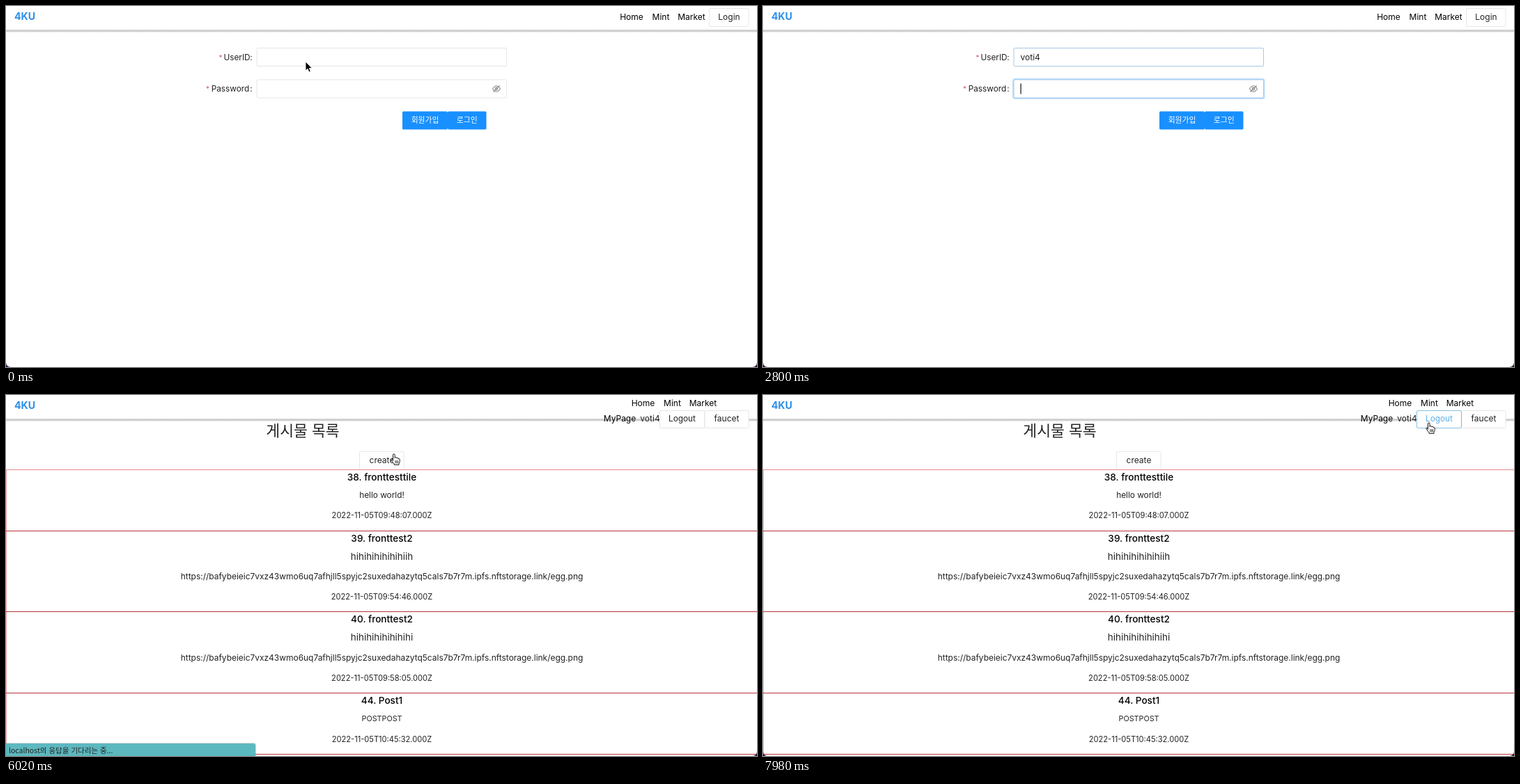
Animation of 1078 by 519 pixels, one loop 8 s. Source, as an HTML page:

```html
<!DOCTYPE html>
<html lang="ko">
<head>
<meta charset="utf-8">
<style>
html, body { margin: 0; width: 100%; height: 100%; overflow: hidden; background: #fff; }
svg { display: block; width: 1078px; height: 519px; }
text { font-family: Inter, "Noto Sans CJK KR", sans-serif; fill: #222; white-space: pre; }
.ko { font-family: "Noto Sans CJK KR", "Noto Sans CJK", sans-serif; }
.nav { fill: #000; }
.box { fill: #fff; stroke: #e6e6e6; }
</style>
</head>
<body>
<svg id="stage" viewBox="0 0 1078 519"></svg>
<script>
const LOOP = 8000, STEP = 70, LOGIN_DONE = 5880;
const USER = 'voti4', LEFT = 369.5, DOT = 4.7;
const userKeys = [1330, 1540, 1610, 1750, 2100];
const passKeys = [3080, 3150, 3220, 3430, 3500, 3570, 3710, 3850, 3920, 3990, 4340];
const FOCUS_USER = 490, FOCUS_PASS = 2520, SUBMIT = 4480;

// y is the optical middle of the line
const text = (x, y, s, size = 11.8, more = '') =>
  `<text x="${x}" y="${y + size * 0.36}" font-size="${size}" text-anchor="middle" ${more}>${s}</text>`;
const box = (x, y, w, h, more = '') =>
  `<rect class="box" x="${x}" y="${y}" width="${w}" height="${h}" rx="1.5" ${more}/>`;
const nav = (x, y, s) => text(x, y, s, 12, 'class="nav"');

const field = (id, y, label, labelX, starX) => `
  <rect id="${id}Glow" x="359" y="${y - 1}" width="360.5" height="28" rx="2.5" fill="none" stroke="#1890ff" stroke-width="2"/>
  ${box(360, y, 358.5, 26, `id="${id}Box"`)}
  ${text(starX, y + 13.5, '*', 10, 'style="fill:#d9565c"')}
  ${text(labelX, y + 13, label)}${text(352, y + 13, ':')}`;

const button = (x, w, s) => `
  <rect x="${x}" y="151.5" width="${w}" height="26" rx="1.5" fill="#1890ff"/>
  ${text(x + w / 2, 164, s, 10.8, 'class="ko" style="fill:#fff"')}`;

const loginPage = `
  ${nav(898, 16, 'Home')}${nav(940, 16, 'Mint')}${nav(984, 16, 'Market')}
  ${box(1009.5, 3.5, 56.5, 26)}${text(1038, 16, 'Login', 12)}
  ${field('user', 60.5, 'UserID', 331.5, 308)}
  ${field('pass', 106, 'Password', 322, 289.5)}
  <text id="userText" x="${LEFT}" y="77.7" font-size="12"></text>
  <g id="dots">${passKeys.map((_, i) =>
    `<circle cx="${LEFT + DOT * (i + 0.5)}" cy="119" r="1.7" fill="#222"/>`).join('')}</g>
  <rect id="caret" width="1.2" height="15" fill="#111"/>
  <g fill="none" stroke="#8c8c8c" stroke-width="1.1">
    <path d="M698.5 119Q704 110.5 709.5 119Q704 127.5 698.5 119ZM699.5 123.5L708.5 114.5"/>
    <circle cx="704" cy="119" r="1.9"/>
  </g>
  <rect id="wave" fill="#1890ff"/>
  ${button(569, 65, '회원가입')}${button(634, 55.5, '로그인')}
  <path d="M634 151v1.5M634 176.5v1.5" stroke="#fff"/>`;

const URL_LINE = 'https://bafybeieic7vxz43wmo6uq7afhjll5spyjc2suxedahazytq5cals7b7r7m.ipfs.nftstorage.link/egg.png';
const posts = [
  [107, '38. fronttesttile', ['hello world!', 11.8], '09:48:07'],
  [194.7, '39. fronttest2', ['hihihihihihihiih', 13.4], '09:54:46', URL_LINE],
  [311.5, '40. fronttest2', ['hihihihihihihihi', 13.4], '09:58:05', URL_LINE],
  [428.2, '44. Post1', ['POSTPOST', 10.8], '10:45:32'],
];
const post = ([y, title, [body, size], time, link]) => `
  ${text(539.5, y + 11, title, 13.6, 'font-weight="500" class="nav"')}
  ${text(539.5, y + 37, body, size)}
  ${link ? text(539.5, y + 66.3, link, 11.96) : ''}
  ${text(539.5, y + (link ? 95.5 : 66.5), `2022-11-05T${time}.000Z`, 11.1)}`;

const listPage = `
  ${nav(914.5, 12, 'Home')}${nav(956.5, 12, 'Mint')}${nav(1000.5, 12, 'Market')}
  ${nav(881, 34, 'MyPage')}${text(924.5, 34, USER, 12)}
  ${box(1003, 22.5, 63, 25)}${text(1034.5, 34, 'faucet', 12)}
  ${box(938.5, 22.5, 64, 25, 'id="outBox"')}${text(970.5, 34, 'Logout', 11.8, 'id="outText"')}
  ${text(426, 51.5, '게시물 목록', 21.6, 'class="ko"')}
  ${box(507.5, 81.5, 63.5, 26)}${text(539.5, 94, 'create', 12)}
  <path d="M0 107.5H1078" stroke="#e08a8d"/>
  <path d="M.5 107V519" stroke="#eba9ab"/>
  <path d="M0 195.5H1078M0 311.5H1078M0 428.5H1078M0 516.5H1078" stroke="#b5343a"/>
  ${posts.map(post).join('')}`;

const corners = `<path fill="#2b1040"
  d="M0 512Q0 519 7 519H0ZM1078 512Q1078 519 1071 519H1078Z"/>`;

const status = `<g id="status">
  <path d="M0 500H356Q359 500 359 503V519H0Z" fill="#000" opacity=".15"/>
  <path d="M0 501H355Q358 501 358 504V519H0Z" fill="#5cb8bf"/>
  <text class="ko" x="4" y="514.5" font-size="10.5">localhost의 응답을 기다리는 중...</text></g>`;

const cursors = `
  <path id="arrow" d="M0 0V13L3 10.3L5 15L7.3 14L5.3 9.5H9.3Z" fill="#000" stroke="#fff" stroke-width=".9"/>
  <path id="beam" d="M-2.5 -8Q0 -8 0 -6.5Q0 -8 2.5 -8M0 -6.5V6.5M-2.5 8Q0 8 0 6.5Q0 8 2.5 8" fill="none" stroke="#333"/>
  <g id="hand" stroke="#111" stroke-linejoin="round" stroke-linecap="round">
    <path d="M3.5 10V2.2Q3.5 .8 4.8 .8T6.1 2.2V6.5Q6.3 5.4 7.4 5.5T8.6 6.9Q9 6 10 6.2T11 7.6Q13.2 6.9 13.2 9V11.5Q13 13 12 14.5V16.3H5.2V15Q3 13 1.2 9.7Q.5 8.3 1.6 7.9T3.5 10Z" fill="#fff"/>
    <path d="M6.9 10.5V14M8.7 10.5V14M10.5 10.5V14" fill="none" stroke-width=".8"/>
  </g>`;

const stage = document.getElementById('stage');
stage.innerHTML = `
  <defs><linearGradient id="shade" x2="0" y2="1">
    <stop stop-color="#c8c8c8"/><stop offset=".6" stop-color="#d2d2d2"/><stop offset="1" stop-color="#fff"/>
  </linearGradient></defs>
  <rect width="1078" height="519" fill="#fff"/>
  <rect y="34.2" width="1078" height="4" fill="url(#shade)"/>
  ${text(27, 14.5, '4KU', 14.2, 'font-weight="700" style="fill:#2e8fe8"')}
  <g id="login">${loginPage}</g><g id="list">${listPage}</g>
  ${corners}${status}${cursors}`;

const $ = id => document.getElementById(id);
const show = (id, on) => $(id).setAttribute('visibility', on ? 'visible' : 'hidden');
const set = (id, attrs) => Object.entries(attrs).forEach(([k, v]) => $(id).setAttribute(k, v));
const ramp = (t, from, to) => Math.max(0, Math.min(1, (t - from) / (to - from)));
const count = (keys, t) => keys.filter(k => k <= t).length;
const mix = (a, b, p) => `rgb(${a.map((v, i) => Math.round(v + (b[i] - v) * p))})`;

// time, x, y
const loginPath = [[0, 430, 80], [70, 430, 74], [350, 428, 74], [5110, 428, 74], [5810, 555, 86]];
const handPath = [[5880, 552, 84], [6090, 552, 84], [6440, 785, 143], [6510, 822, 122], [6650, 880, 69],
  [6720, 904, 62], [6790, 904, 62], [7140, 982, 37], [7630, 973, 33], [7910, 971, 33], [7980, 951, 39]];

function along(path, t) {
  const n = path.findIndex(p => p[0] > t);
  if (n < 0) return path[path.length - 1].slice(1);
  const a = path[n - 1], b = path[n], p = ramp(t, a[0], b[0]);
  return [1, 2].map(i => a[i] + (b[i] - a[i]) * p);
}

function focusLook(id, glow, seen) {
  set(id + 'Glow', { opacity: glow * 0.28 });
  $(id + 'Box').style.stroke = mix([230, 230, 230], [165, 200, 228], seen);
}

function drawLogin(t) {
  const typed = count(userKeys, t), dots = count(passKeys, t), inPass = t >= FOCUS_PASS;
  $('userText').textContent = USER.slice(0, typed);
  [...$('dots').children].forEach((dot, i) => dot.setAttribute('opacity', i < dots ? 1 : 0));

  const userOn = ramp(t, FOCUS_USER, 700);
  focusLook('user', userOn * (1 - ramp(t, FOCUS_PASS, 2740)), userOn);
  const passOn = ramp(t, FOCUS_PASS, 2740);
  focusLook('pass', passOn, passOn);

  const lastKey = Math.max(...[FOCUS_USER, FOCUS_PASS, ...userKeys, ...passKeys].filter(k => k <= t));
  const width = inPass ? dots * DOT : typed && $('userText').getComputedTextLength();
  set('caret', { x: LEFT + width, y: inPass ? 111.5 : 66, opacity: t >= FOCUS_USER && (t - lastKey) % 1000 < 500 ? 1 : 0 });

  const p = ramp(t, SUBMIT, 4900), grow = 3 * ramp(p, 0, 0.4);
  set('wave', { x: 634 - grow, y: 151.5 - grow, width: 55.5 + 2 * grow, height: 26 + 2 * grow, rx: 3,
    opacity: t < SUBMIT ? 0 : 0.2 * (1 - p) });
}

function draw(now) {
  const time = now % LOOP, t = Math.floor(time / STEP) * STEP, login = t < LOGIN_DONE;
  $('login').style.display = login ? '' : 'none';
  $('list').style.display = login ? 'none' : '';
  if (login) drawLogin(t);

  set('status', { opacity: login ? 0 : 1 - ramp(t, 6300, 6460) });
  const hover = ramp(t, 7070, 7350);
  $('outBox').style.stroke = mix([230, 230, 230], [135, 192, 228], hover);
  $('outText').style.fill = mix([34, 34, 34], [92, 176, 228], hover);

  const arrow = t < 70 || (login && t >= 5600);
  const beam = !arrow && (t < userKeys[0] || (login && t >= 5110));
  const [x, y] = along(login ? loginPath : handPath, t);
  for (const [id, on] of [['arrow', arrow], ['beam', beam], ['hand', !login]]) {
    show(id, on);
    set(id, { transform: `translate(${x} ${y})` });
  }
}

const start = performance.now();
function tick() {
  draw(performance.now() - start);
  requestAnimationFrame(tick);
}
tick();
</script>
</body>
</html>
```
